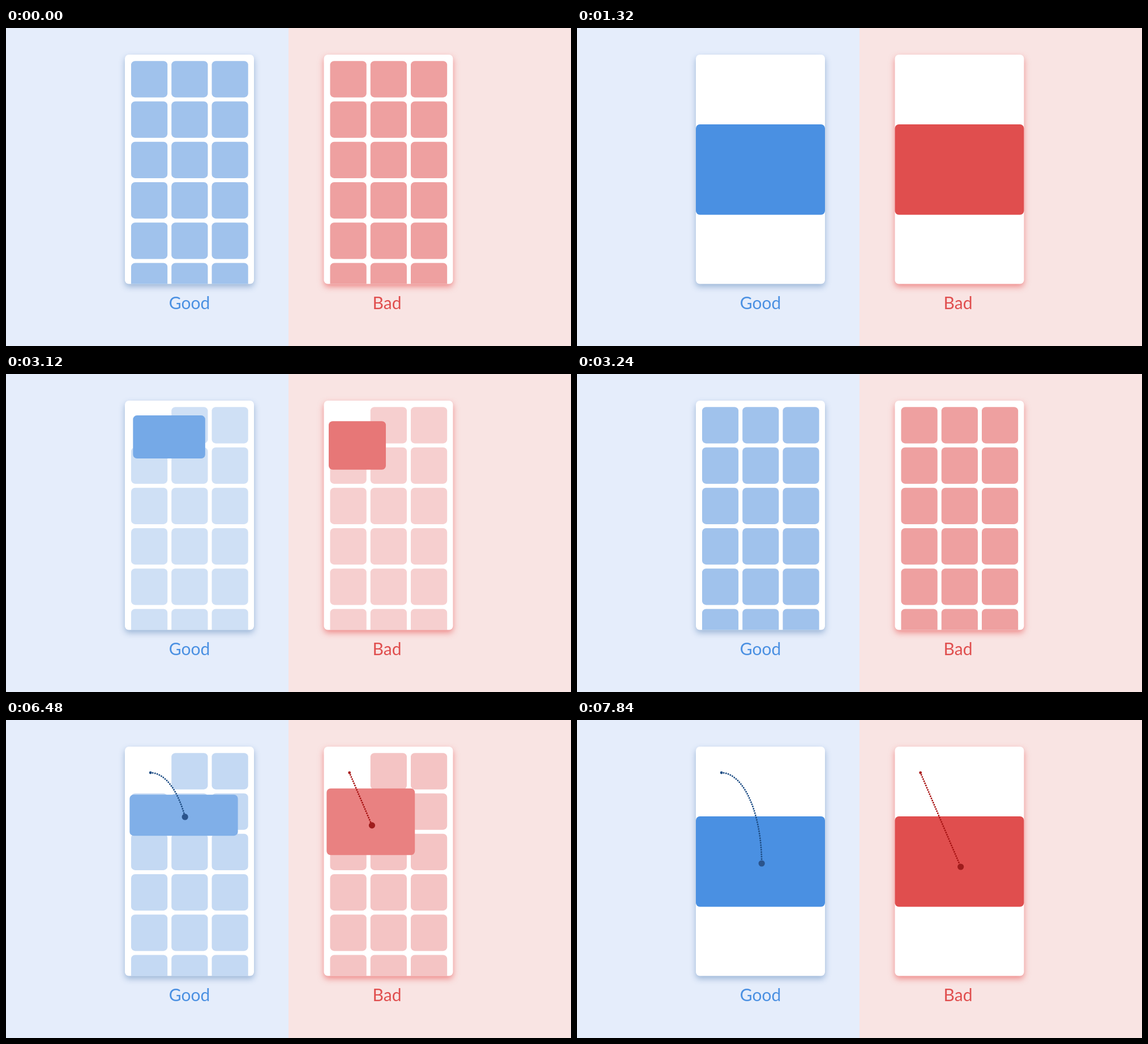
An HTML page with a canvas that plays this animation: 998x561 px, repeating every 8000 ms.

```html
<!DOCTYPE html>
<html lang="en">
<head>
<meta charset="utf-8">
<title>Arc and straight motion</title>
<style>
  html, body { margin: 0; width: 100%; height: 100%; overflow: hidden; }
  canvas, svg { position: absolute; left: 0; top: 0; width: 998px; height: 561px; }
  text { font: 400 30px Lato, "Open Sans", sans-serif; text-anchor: middle; }
</style>
</head>
<body>
<canvas id="stage" width="998" height="561"></canvas>
<svg viewBox="0 0 998 561">
  <text x="324" y="496.3" fill="#4a90e2">Good</text>
  <text x="673" y="496.3" fill="#e04e4e">Bad</text>
</svg>
<script>
const ctx = document.getElementById('stage').getContext('2d');
const LOOP = 8000, STEP = 40;
const CELL = 64.2, PITCH = 71.25;

const clamp = v => Math.min(1, Math.max(0, v));
const mix = (a, b, p) => a + (b - a) * p;
const span = (t, from, to) => clamp((t - from) / (to - from));
const rgb = c => `rgb(${c.map(Math.round).join()})`;

// cubic-bezier(.4, 0, .2, 1)
function ease(x) {
  let lo = 0, hi = 1;
  for (let i = 0; i < 24; i++) {
    const s = (lo + hi) / 2, r = 1 - s;
    if (1.2 * r * r * s + 0.6 * r * s * s + s * s * s < x) lo = s; else hi = s;
  }
  return lo * lo * (3 - 2 * lo);
}

// Quarter ellipse, travelled by arc length
const ARC = 240, lengths = [0];
const arcAt = a => [Math.sin(a), 1 - Math.cos(a)];
for (let i = 1; i <= ARC; i++) {
  const a = (i - 0.5) / ARC * Math.PI / 2;
  lengths.push(lengths[i - 1] + Math.hypot(71 * Math.cos(a), 160 * Math.sin(a)));
}
function arc(p) {
  const goal = p * lengths[ARC];
  let i = 1;
  while (i < ARC && lengths[i] < goal) i++;
  const f = (goal - lengths[i - 1]) / (lengths[i] - lengths[i - 1]);
  return arcAt((i - 1 + f) / ARC * Math.PI / 2);
}
const line = p => [p, p];

const panels = [
  { x: 210, path: arc, drop: 160, curved: true, back: '#e5edfb', shadow: 'rgba(55,105,165,.42)',
    tile: [160, 194, 236], full: [74, 144, 226], trail: '#1f4e85', ball: '#2b548c' },
  { x: 561.5, path: line, drop: 166, curved: false, back: '#f9e4e3', shadow: 'rgba(228,60,60,.52)',
    tile: [238, 160, 160], full: [224, 78, 78], trail: '#a81414', ball: '#9f1c1c' }
];

function box(x, y, w, h, r, fill) {
  ctx.beginPath();
  ctx.roundRect(x, y, w, h, r);
  ctx.fillStyle = fill;
  ctx.fill();
}

function disc(x, y, r, fill) {
  ctx.beginPath();
  ctx.arc(x, y, r, 0, Math.PI * 2);
  ctx.fillStyle = fill;
  ctx.fill();
}

// How far the tile is open: tint, travel, width and height, each 0 to 1
function pose(t, curved) {
  const closing = t >= 3000 && t < 6000;
  const u = closing ? span(t, 3000, 3240)
    : t < 3000 ? span(t, 1000, 1320) : span(t, 6000, 7280);
  const p = ease(u);
  let w = p, h = p;
  if (curved) {
    w = ease(closing ? span(u, 1 / 6, 1) : span(u, 0, 0.75));
    h = ease(closing ? span(u, 0, 5 / 6) : span(u, 0.25, 1));
  }
  return closing ? { tint: 1 - u, p: 1 - p, w: 1 - w, h: 1 - h } : { tint: u, p, w, h };
}

function drawGrid(k, alpha) {
  ctx.save();
  ctx.beginPath();
  ctx.roundRect(k.x, 47, 228, 404.5, 7);
  ctx.clip();
  ctx.globalAlpha = alpha;
  for (let i = 1; i < 18; i++) {
    box(k.x + 11 + i % 3 * PITCH, 58.2 + Math.floor(i / 3) * PITCH, CELL, CELL, 7, rgb(k.tile));
  }
  ctx.restore();
}

function drawTrail(k, p, alpha) {
  const at = q => {
    const [x, y] = k.path(q);
    return [k.x + 45.2 + 71 * x, 93 + k.drop * y];
  };
  ctx.save();
  ctx.globalAlpha = alpha;
  if (p > 0) {
    ctx.beginPath();
    for (let i = 0; i <= 80; i++) ctx.lineTo(...at(p * i / 80));
    ctx.setLineDash([0, 4.1]);
    ctx.lineCap = 'round';
    ctx.lineWidth = 3;
    ctx.strokeStyle = k.trail;
    ctx.stroke();
  }
  disc(...at(p), 5.6, k.ball);
  disc(...at(0), 2.4, k.trail);
  ctx.restore();
}

function drawPanel(k, t) {
  ctx.save();
  ctx.shadowColor = k.shadow;
  ctx.shadowBlur = 11;
  ctx.shadowOffsetY = 5;
  box(k.x, 47, 228, 404.5, 7, '#fff');
  ctx.restore();

  const s = pose(t, k.curved);
  drawGrid(k, 1 - s.tint);

  const [px, py] = k.path(s.p);
  const w = mix(CELL, 228, s.w), h = mix(CELL, 159.5, s.h);
  const cx = k.x + mix(43.1, 114, px), cy = mix(90.3, 249.7, py);
  box(cx - w / 2, cy - h / 2, w, h, 7, rgb(k.tile.map((c, i) => mix(c, k.full[i], s.tint))));

  const shown = span(t, 5840, 6000);
  if (shown) drawTrail(k, t < 6000 ? 0 : s.p, shown);
}

function draw(now) {
  const t = Math.floor(now % LOOP / STEP) * STEP;
  ctx.fillStyle = panels[0].back;
  ctx.fillRect(0, 0, 499, 561);
  ctx.fillStyle = panels[1].back;
  ctx.fillRect(499, 0, 499, 561);
  panels.forEach(k => drawPanel(k, t));
}

const start = performance.now();
function loop() {
  draw(performance.now() - start);
  requestAnimationFrame(loop);
}
loop();
</script>
</body>
</html>
```
